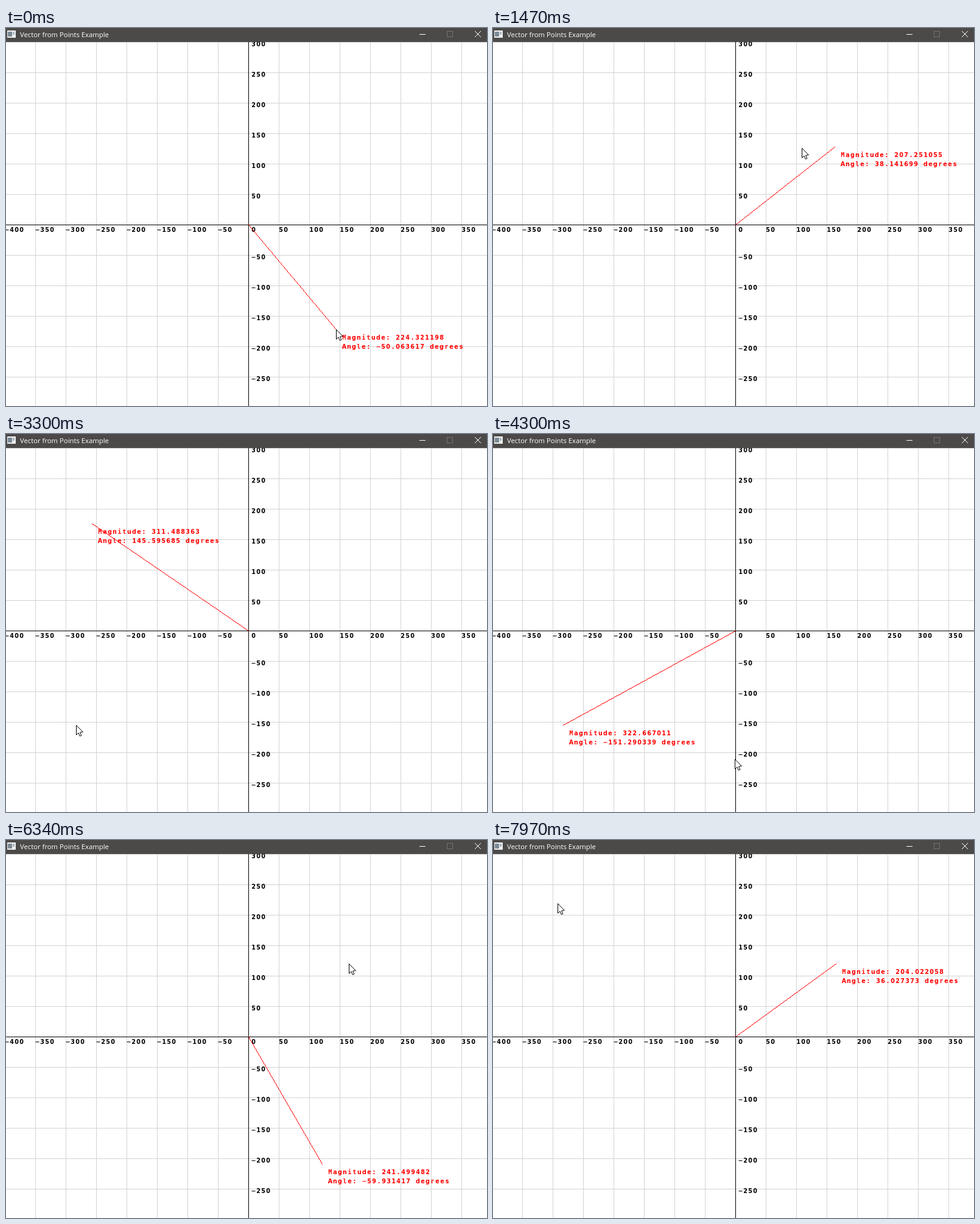
An HTML page with a canvas for the animation above (8 s loop, 790 by 621 pixels).

```html
<!DOCTYPE html>
<html>
<head>
<meta charset="utf-8">
<title>Vector from Points Example</title>
<style>
  html, body { margin: 0; width: 100%; height: 100%; overflow: hidden; background: #fff; }
  canvas { display: block; }
</style>
</head>
<body>
<canvas id="stage" width="790" height="621"></canvas>
<script>
const ctx = document.getElementById('stage').getContext('2d');
const W = 790, H = 621, LOOP = 8000, BAR = 23, CELL = 8;
const OX = 398, OY = 323;        // screen position of the plot origin
const SAMPLE = 67, PRESS = 133;  // pointer sampling and click length in ms

// The pointer travels to each plot point and clicks it, which sets the vector.
// `bow` is the sideways bulge of the travelled path in pixels.
const visits = [
  { start: 0, end: 0, click: -PRESS, x: 144, y: -172, bow: 0 },
  { start: 203, end: 1040, click: 1140, x: 163, y: 128, bow: 8 },
  { start: 1336, end: 2200, click: 2340, x: -257, y: 176, bow: -20 },
  { start: 2473, end: 3330, click: 3700, x: -283, y: -155, bow: -30 },
  { start: 4099, end: 4506, click: 5320, x: 121, y: -209, bow: 23 },
  { start: 5720, end: 6340, click: 6740, x: 165, y: 120, bow: 4 },
  { start: 7213, end: 8100, click: 8200, x: -298, y: 223, bow: -55 }
];

// Smooth start, longer settling at the end
function ease(u) {
  const w = 1 - (1 - u) ** 1.5;
  return w * w * (3 - 2 * w);
}

function pointerAt(t) {
  const i = visits.findLastIndex(v => v.start <= t);
  const to = visits[i], from = visits[i - 1] || to;
  const elapsed = SAMPLE * Math.floor((t - to.start) / SAMPLE + 0.1);
  const p = ease(Math.min(1, elapsed / (to.end - to.start || 1)));
  const dx = to.x - from.x, dy = from.y - to.y;
  const side = to.bow * Math.sin(Math.PI * p) / (Math.hypot(dx, dy) || 1);
  return [
    Math.round(OX + from.x + dx * p - dy * side),
    Math.round(OY - from.y + dy * p + dx * side)
  ];
}

function rect(color, x, y, w, h) {
  ctx.fillStyle = color;
  ctx.fillRect(x, y, w, h);
}

// Fixed-width text, placed by its top left corner; slim letters get slab forms
function cellText(text, x, y, color) {
  ctx.fillStyle = color;
  ctx.textAlign = 'center';
  [...text].forEach((c, i) => {
    ctx.font = /[Milrt]/.test(c) ? 'bold 9.6px "DejaVu Sans Mono", monospace'
                                 : 'bold 9.6px "DejaVu Sans", sans-serif';
    ctx.fillText(c === '-' ? '\u2212' : c, x + CELL * i + 3.5, y + 7);
  });
}

function drawGrid() {
  rect('#fff', 0, 0, W, H);
  for (let x = OX - 400; x < W; x += 50) rect('#d3d3d3', x, BAR, 1, H);
  for (let y = BAR; y < H; y += 50) rect('#d3d3d3', 0, y, W, 1);
  rect('#000', OX, BAR, 1, H);
  rect('#000', 0, OY, W, 1);
  for (let v = -400; v < 400; v += 50) {
    cellText(String(v), OX + v + (v ? 0 : 5), OY + 5, '#000');
    if (v && v >= -250 && v <= 300) cellText(String(v), OX + 5, OY - v, '#000');
  }
}

function drawVector({ x, y }) {
  const n = Math.max(Math.abs(x), Math.abs(y));
  for (let i = 0; i <= n; i++)
    rect('#f00', Math.round(OX + x * i / n), Math.round(OY - y * i / n), 1, 1);
  const angle = Math.atan2(y, x) * 180 / Math.PI;
  const left = OX + x + 10, top = OY - y + 10;
  cellText(`Magnitude: ${Math.hypot(x, y).toFixed(6)}`, left, top, '#f00');
  cellText(`Angle: ${angle.toFixed(6)} degrees`, left, top + 15, '#f00');
}

const arrow = new Path2D('M.5 .5V16.3L4 13L6.3 18.4L8.8 17.3L6.6 12.2L11.3 11.6Z');

function drawPointer([x, y]) {
  ctx.save();
  ctx.translate(x, y);
  ctx.fillStyle = '#fff';
  ctx.fill(arrow);
  ctx.strokeStyle = '#000';
  ctx.stroke(arrow);
  ctx.restore();
}

function drawHalo({ x, y }) {
  ctx.fillStyle = 'rgba(255,255,0,.47)';
  ctx.beginPath();
  ctx.arc(OX + x, OY - y, 12, 0, 2 * Math.PI);
  ctx.fill();
}

function drawTitleBar() {
  rect('#4b4a48', 0, 0, W, BAR);
  rect('#f0f0f0', 2, 4, 14, 12);
  rect('#7b8a94', 3, 6, 7, 8);
  rect('#a9b8c4', 11, 6, 3, 5);
  ctx.fillStyle = '#fff';
  ctx.textAlign = 'left';
  ctx.font = '11.3px "Open Sans", sans-serif';
  ctx.fillText('Vector from Points Example', 23, 15);
  rect('#fff', 679, 10, 10, 1);
  ctx.strokeStyle = '#74736f';
  ctx.strokeRect(724.5, 5.5, 9, 9);
  ctx.strokeStyle = '#fff';
  ctx.stroke(new Path2D('M770 5L780 15M780 5L770 15'));
}

function draw() {
  const t = performance.now() % LOOP;
  const pressed = visits.find(v => t >= v.click && t < v.click + PRESS);
  drawGrid();
  drawVector(visits.findLast(v => v.click + PRESS <= t));
  drawPointer(pointerAt(t));
  if (pressed) drawHalo(pressed);
  drawTitleBar();
  requestAnimationFrame(draw);
}
draw();
</script>
</body>
</html>
```
